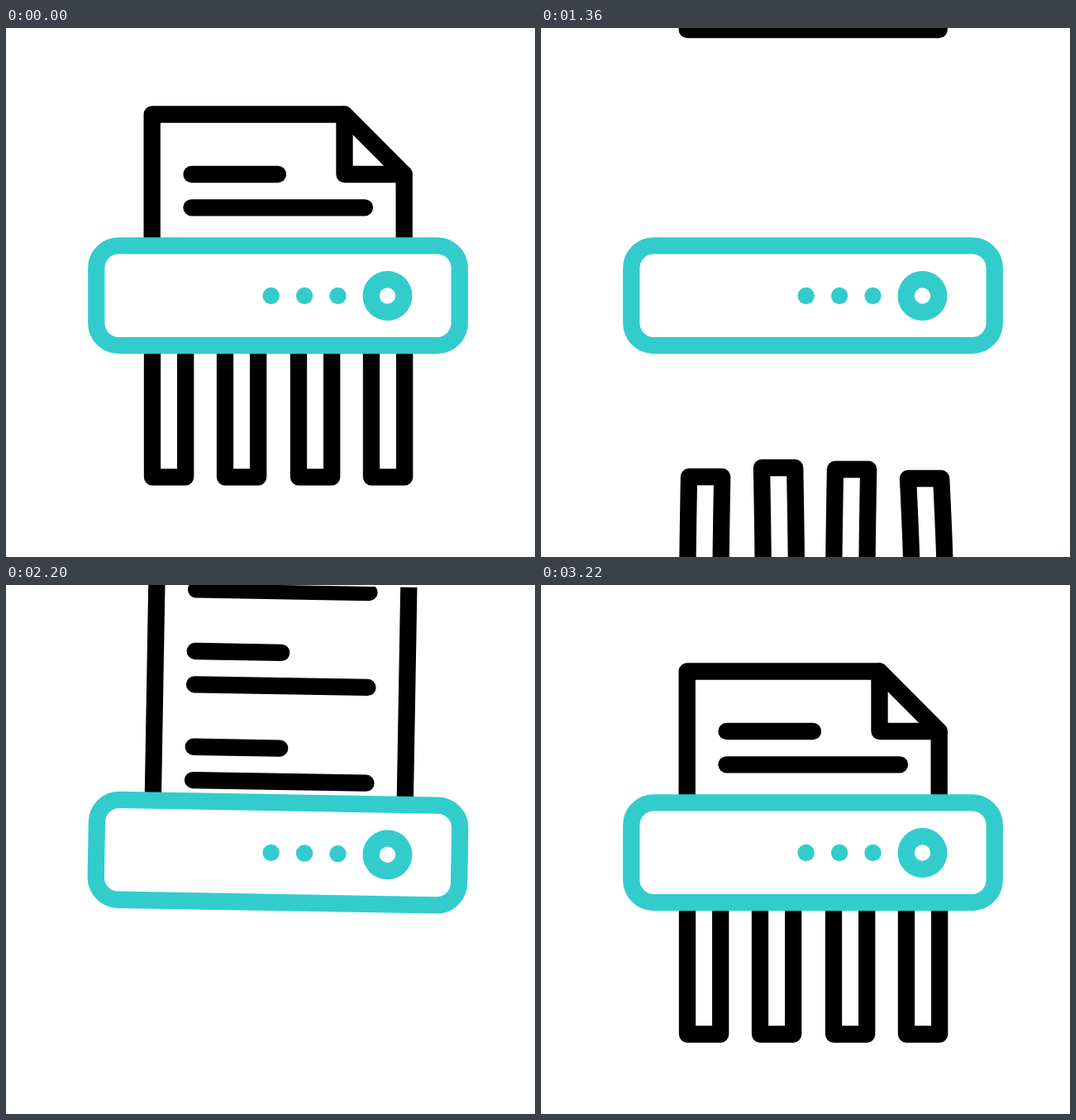
Write an HTML page with a canvas that moves like this. It is 640x640 px and loops after 3600 ms.

```html
<!DOCTYPE html>
<html>
<head>
<meta charset="utf-8">
<title>Paper shredder</title>
<style>
html, body { margin: 0; width: 100%; height: 100%; overflow: hidden; background: #fff; }
canvas { display: block; width: 640px; height: 640px; }
</style>
</head>
<body>
<canvas id="stage" width="640" height="640"></canvas>
<script>
const LOOP = 3600, STEP = 20, TEAL = '#33cccc', SPLIT = 2440;
const CX = 329, CY = 324;
const c = document.getElementById('stage').getContext('2d');
const stripX = [177, 265, 354, 442];
const bend = [-2, 2, -2, 5.5];
const lag = [5, -6, -4, 7];

// Piecewise linear track of [time, value] points
function track(points, t) {
  if (t <= points[0][0]) return points[0][1];
  for (let i = 1; i < points.length; i++) {
    const [t0, v0] = points[i - 1], [t1, v1] = points[i];
    if (t < t1) return v0 + (v1 - v0) * (t - t0) / (t1 - t0);
  }
  return points[points.length - 1][1];
}

const feed = t => track([[220, 0], [440, 87], [740, 153], [1360, 272], [1960, 387]], t);
const settle = t => (1 - Math.min(1, (t - 2400) / 660)) ** 2;
const bottomY = t => t < 2400
  ? track([[1320, -3.5], [1360, 12], [1960, 245.5], [2400, 417]], t)
  : 553.5 - 136.5 * settle(t);
const topShift = t => t < 2400
  ? -122 - 0.441 * (2400 - t)
  : -122 * settle(t);

function line(points, close) {
  c.beginPath();
  points.forEach(([x, y]) => c.lineTo(x, y));
  if (close) c.closePath();
  c.stroke();
}

function clipped(y, h, draw) {
  c.save();
  c.beginPath();
  c.rect(-20, y, 680, h);
  c.clip();
  draw();
  c.restore();
}

function textPair(y) {
  line([[224.5, y], [329, y]]);
  line([[224.5, y + 40.3], [434, y + 40.3]]);
}

function page(dy, bottom) {
  line([[176.7, bottom], [176.7, 104.5 + dy], [409.5, 104.5 + dy],
        [481.7, 177 + dy], [481.7, bottom]], true);
  line([[409.5, 104.5 + dy], [409.5, 177 + dy], [481.7, 177 + dy]]);
  textPair(177 + dy);
  textPair(292 + dy);
}

function strip(x, top, bottom, sway) {
  const left = [], right = [];
  for (let i = 0; i <= 24; i++) {
    const y = top + (bottom - top) * i / 24;
    const dx = sway * Math.sin((y - top) / 115);
    left.push([x + dx, y]);
    right.unshift([x + 40.2 + dx, y]);
  }
  line(left.concat(right), true);
}

function firstSheet(t) {
  const dy = feed(t);
  const sway = track([[240, 0], [440, 0.45], [740, 1]], t);
  const drift = track([[740, 0], [1360, 1]], t);
  clipped(0, CY, () => page(dy, 600 + dy));
  clipped(CY, 316, () => stripX.forEach((x, i) =>
    strip(x + 2 * drift, 266 + dy + lag[i] * drift, 543.3 + dy, bend[i] * sway)));
}

function secondSheet(t) {
  const bottom = bottomY(t) - 10;
  const draw = () => {
    page(topShift(t), bottom);
    textPair(bottom - 131.5);
  };
  if (t < SPLIT) return draw();
  clipped(0, CY, draw);
  clipped(CY, 316, () => stripX.forEach(x => strip(x, 266, bottom, 0)));
}

function dot(x, r, color) {
  c.fillStyle = color;
  c.beginPath();
  c.arc(x, 324, r, 0, 7);
  c.fill();
}

function machine(t) {
  c.strokeStyle = TEAL;
  c.fillStyle = '#fff';
  c.beginPath();
  c.roundRect(109.3, 263.3, 439.4, 120.8, 27);
  c.fill();
  c.stroke();
  dot(461.5, 30, TEAL);
  dot(461.5, 9.7, '#fff');
  const lit = (t >= 240 && t < 940) || (t >= 2520 && t < 3220);
  [320.7, 361.1, 401.5].forEach(x => dot(x, 10.2, lit ? '#000' : TEAL));
}

function draw(t) {
  const shaken = t >= 240 && t < 2920 && t % 200 < 100;
  c.fillStyle = '#fff';
  c.fillRect(0, 0, 640, 640);
  c.save();
  c.translate(CX, CY);
  c.rotate(shaken ? Math.PI / 180 : 0);
  c.translate(-CX, -CY);
  c.lineWidth = 20.3;
  c.lineJoin = c.lineCap = 'round';
  c.strokeStyle = '#000';
  clipped(0, 640, () => {
    if (t < 2000) firstSheet(t);
    if (t >= 1320) secondSheet(t);
  });
  machine(t);
  c.restore();
}

const start = performance.now();
function tick() {
  const t = (performance.now() - start) % LOOP;
  draw(Math.floor(t / STEP) * STEP);
  requestAnimationFrame(tick);
}
tick();
</script>
</body>
</html>
```
